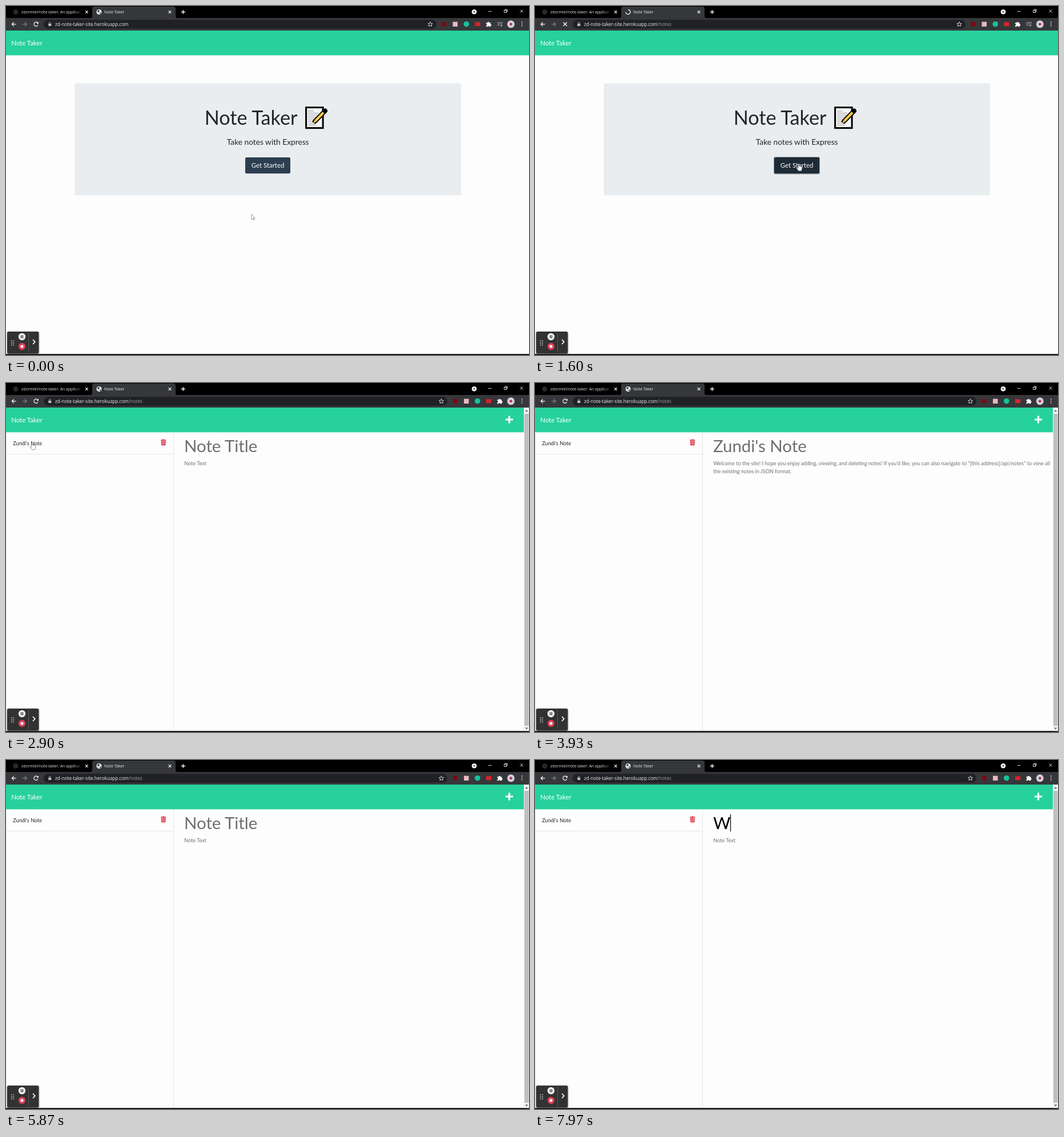
An HTML page for the animation above (8000 ms loop, 916 by 611 pixels).

```html
<!DOCTYPE html>
<html lang="en">
<head>
<meta charset="utf-8">
<title>Note Taker</title>
<style>
  html, body { margin: 0; width: 100%; height: 100%; overflow: hidden; background: #000; }
  svg { display: block; width: 916px; height: 611px; }
  text { font-family: Lato, sans-serif; white-space: pre; }
  .ui { font-family: "Open Sans", "Noto Sans", sans-serif; }
  .line { fill: none; stroke: #fff; }
  .mid { text-anchor: middle; }
  .base { font-size: 9.15px; }
  .title { font-size: 29.4px; }
  .brand { font-size: 11.44px; fill: #fff; }
</style>
</head>
<body>
<svg viewBox="0 0 916 611">
  <defs>
    <linearGradient id="fade" gradientUnits="userSpaceOnUse" x1="119" x2="133" y1="0" y2="0">
      <stop offset="0" stop-color="#e0e0e0"/><stop offset="1" stop-color="#e0e0e0" stop-opacity="0"/>
    </linearGradient>
    <filter id="shadow" x="-20%" y="-20%" width="140%" height="140%">
      <feDropShadow dx="0" dy="1" stdDeviation="1.5" flood-opacity=".45"/>
    </filter>
  </defs>

  <rect y="43" width="916" height="566.5" fill="#fdfdfd"/>
  <rect y="43" width="916" height="43.3" fill="#27d19c"/>
  <text class="brand" x="9.2" y="69">Note Taker</text>

  <g id="home">
    <rect x="120.5" y="135.5" width="676.5" height="196" rx="2.5" fill="#e9edef"/>
    <text x="347.7" y="207.5" font-size="34.2" fill="#212529">Note Taker</text>
    <g id="memo">
      <rect x="525.6" y="177.6" width="29.5" height="36" fill="#f4f4f4" stroke="#000" stroke-width="3"/>
      <path d="M529 184h10M529 187.5h18M529 191h18M529 194.5h15M529 198h12M529 201.5h9M529 205h9M529 208.5h14" stroke="#9a9da0" stroke-width="1.1"/>
      <path d="M559 183.5L541 202" stroke="#000" stroke-width="8" stroke-linecap="round"/>
      <path d="M556 186.5L541.5 201.5" stroke="#f7ca45" stroke-width="4.2"/>
      <path d="M540 200l3 3-5.500 3z" fill="#e8b878"/>
    </g>
    <text class="mid" x="458.7" y="242.500" font-size="13.73" fill="#212529">Take notes with Express</text>
    <rect id="ring" x="418" y="264" width="81" height="30.500" rx="3" fill="#8d9b9f"/>
    <rect id="button" x="419" y="265" width="79" height="28.300" rx="2.500"/>
    <text class="brand mid" x="458.5" y="283.3">Get Started</text>
  </g>

  <g id="notes">
    <path d="M.5 86.500V609M293.500 86.500V609M1 124.300H293" stroke="#e3e5e7" fill="none"/>
    <text class="base" x="12.3" y="108.500" fill="#212529">Zundi's Note</text>
    <g fill="#d9364a">
      <path d="M271 99.600h3l.7-1.100h2.200l.7 1.100h2.900v1.400H271zM271.700 101.700h8.200l-.5 7.600h-7.200z"/>
      <path d="M273.800 103v5M275.800 103v5M277.800 103v5" stroke="#fbe4e7" stroke-width=".7"/>
    </g>
    <path class="line" d="M881.500 57.500v13M875 64h13" stroke-width="3.200"/>
    <text id="noteTitle" class="title" x="312" y="121"></text>
    <text class="base" x="312.200" y="144" fill="#707070"><tspan id="line1"></tspan><tspan id="line2" x="312.200" dy="13.600"></tspan></text>
    <path id="caret" d="M0 95V125" stroke="#000" stroke-width="1.200"/>
    <rect x="907" y="43" width="9" height="566.500" fill="#f1f1f1"/>
    <rect x="908" y="54" width="7.500" height="546" fill="#bfbfbf"/>
    <path d="M909.500 50l2.300-3 2.300 3zM909.500 603.500l2.300 3 2.300-3z" fill="#555"/>
  </g>

  <g id="chrome">
    <rect width="916" height="43" fill="#000"/>
    <path d="M147 21.500q4 0 4-4V5q0-4 4-4h138q4 0 4 4v12.500q0 4 4 4z" fill="#36373a"/>
    <rect y="21" width="916" height="22" fill="#36373a"/>
    <circle cx="17" cy="10.500" r="4.500" fill="#24292e"/>
    <text class="ui" x="27" y="13" font-size="6.900" fill="url(#fade)">zdormiel/note-taker: An applicat</text>
    <text class="ui" x="172" y="13" font-size="7" fill="#eee">Note Taker</text>
    <g id="globe">
      <circle cx="163" cy="10.500" r="4.500" fill="#f1f3f4"/>
      <path d="M160 8.500l3-1.500 1.300 1.500-1.800 2.200-2.500-.5zM164 11.500l2.300-.5-.8 2.500-1.500.5zM160.500 12l1.800.8-.3 1.200z" fill="#36373a"/>
    </g>
    <path id="spinner" class="line" d="M163 6.500a4 4 0 1 1-4 4" stroke-width="1.300"/>
    <path class="line" d="M139 8.200l4.600 4.600m0-4.600l-4.600 4.600M284.700 8.200l4.600 4.600m0-4.600l-4.600 4.600" stroke-width="1.100"/>
    <path class="line" d="M310.300 7v7M306.800 10.500h7" stroke-width="1.300"/>
    <circle cx="820" cy="10.300" r="4.300" fill="#fff"/>
    <path d="M818 9.500h4l-2 2.300z"/>
    <path class="line" d="M844.500 9.500h6M872.500 7.500h4v4h-4zM874 7.500V6h4v4h-1.500M900.500 6.500l5 5m0-5l-5 5" stroke-width=".8"/>
    <path class="line" d="M17.500 31.800h-7.200m3.500-3.500l-3.500 3.500 3.500 3.500" stroke-width="1.200"/>
    <path class="line" d="M29 31.800h7.200m-3.500-3.500l3.500 3.500-3.500 3.500" stroke-width="1.200" style="stroke:#818386"/>
    <path id="reload" class="line" d="M55.500 29.600a3.600 3.600 0 1 0 .5 3.300M56.300 28v2.500h-2.500" stroke-width="1.200"/>
    <path id="stop" class="line" d="M49.500 28.500l6.500 6.500m0-6.500l-6.500 6.500" stroke-width="1.300"/>
    <rect id="omnibox" x="66" y="24.300" height="15.400" rx="7.700" fill="#202124"/>
    <rect x="74.300" y="31" width="5" height="4" rx=".5" fill="#bdc1c6"/>
    <path class="line" d="M75.400 31v-1.200a1.400 1.400 0 0 1 2.800 0V31" stroke-width=".8" style="stroke:#bdc1c6"/>
    <text class="ui" x="86" y="34.700" font-size="8.140" fill="#eee">zd-note-taker-site.herokuapp.com<tspan id="path" fill="#9aa0a6">/notes</tspan></text>
    <g id="extensions">
      <path class="line" d="M743 27.800l1.200 2.700 2.900.3-2.200 1.900.7 2.900-2.600-1.500-2.600 1.500.7-2.900-2.200-1.900 2.900-.3z" stroke-width=".8"/>
      <circle cx="767.300" cy="31.800" r="4" fill="#80060f"/>
      <rect x="782.500" y="27.700" width="8.500" height="8.300" fill="#e6b9bd"/>
      <circle cx="806.300" cy="31.700" r="4.800" fill="#15c39a"/>
      <rect x="821.500" y="28.300" width="9" height="7" fill="#d8232e"/>
      <path d="M841 29.300h2.400a1.500 1.500 0 0 1 3 0h2.300v2.300a1.500 1.500 0 0 1 0 3V36.300h-2.500a1.400 1.400 0 0 0-2.800 0H841v-2.200a1.400 1.400 0 0 0 0-2.800z" fill="#fff"/>
    </g>
    <g id="media">
      <path class="line" d="M860.500 28.700h6.500M860.500 31.200h6.500M860.500 33.700h4M868.300 34.500v-6h1.700" stroke-width="1" style="stroke:#a5a7aa"/>
      <circle cx="867.200" cy="34.500" r="1.300" fill="#a5a7aa"/>
    </g>
    <circle cx="884.300" cy="31.800" r="6.500" fill="#cfd3e2"/>
    <circle cx="884.300" cy="31.800" r="2.400" fill="#c6285a"/>
    <path d="M903.700 28.200v8" stroke="#fff" stroke-width="1.700" stroke-dasharray="0 3.300" stroke-linecap="round"/>
  </g>

  <g id="recorder">
    <rect x="2" y="570" width="55.500" height="38.500" rx="2.500" fill="#333" filter="url(#shadow)"/>
    <path d="M9.700 585.500v9M13.200 585.500v9" stroke="#ddd" stroke-width="1.600" stroke-dasharray="1.600 2"/>
    <circle cx="28" cy="579" r="6.200" fill="#f5f5f5"/>
    <path d="M26.600 576.300v5.400M29.400 576.300v5.400" stroke="#222" stroke-width="1.300"/>
    <circle cx="28" cy="596" r="6.200" fill="#dc3c56"/>
    <rect x="25.700" y="593.700" width="4.600" height="4.600" fill="#fff"/>
    <path d="M39.500 572v34" stroke="#666" stroke-width=".8"/>
    <path class="line" d="M47 584l3.800 4-3.800 4" stroke-width="1.700"/>
  </g>
  <rect y="609.500" width="916" height="1.500"/>

  <g id="cursor" fill="#fff" stroke="#555" stroke-width=".6" stroke-linejoin="round">
    <path id="arrow" d="M0 0v9l2-1.800 1.500 3.300 1.500-.7-1.500-3.100h2.700z"/>
    <path id="hand" d="M-1 1q0-1.200 1-1.200t1 1.200v3.200l3.700.8q1.300.3 1.300 1.500l-.6 3-.9 2.800h-5l-3.300-4.500q-.6-1 .3-1.400.8-.2 1.500.7l1 .8z"/>
  </g>
</svg>
<script>
const LOOP = 8000;
const CLICK_START = 1420, NOTES_OPEN = 1650, SHOW_NOTE = 3300, NEW_NOTE = 5300, FOCUS = 7000, TYPE = 7700;

// Pointer stops: time, x, y
const STOPS = [
  [0, 430, 364.5], [300, 430, 364.5], [850, 462, 276.5], [1750, 462, 276.5],
  [2600, 46, 104.500], [3450, 46, 104.500], [3800, 330, 140], [4600, 700, 130],
  [5050, 881, 64], [5450, 881, 64], [5800, 840, 100], [6700, 440, 110], [8000, 440, 110]
];
const EMPTY = ["Note Title", "Note Text", ""];
const WELCOME = [
  "Zundi's Note",
  "Welcome to the site! I hope you enjoy adding, viewing, and deleting notes! If you'd like, you can also navigate to \"[this address]/api/notes\" to view all",
  "the existing notes in JSON format."
];

const $ = id => document.getElementById(id);
const show = (id, on) => $(id).setAttribute("visibility", on ? "visible" : "hidden");
const attr = (id, name, value) => $(id).setAttribute(name, value);
const setText = (id, value) => { if ($(id).textContent !== value) $(id).textContent = value; };

function pointerAt(t) {
  const i = STOPS.findIndex(stop => stop[0] > t);
  const [t0, x0, y0] = STOPS[i - 1], [t1, x1, y1] = STOPS[i];
  const p = (t - t0) / (t1 - t0), e = p * p * (3 - 2 * p);
  return [x0 + (x1 - x0) * e, y0 + (y1 - y0) * e];
}

function pointerKind(x, y, onNotes) {
  if (!onNotes) return x > 419 && x < 498 && y > 265 && y < 293 ? "hand" : "arrow";
  if (y < 86) return x > 872 && x < 891 ? "hand" : "arrow";
  if (x > 293) return "none";
  return y < 124 ? "hand" : "arrow";
}

function draw(t) {
  const onNotes = t >= NOTES_OPEN;
  const loading = t >= CLICK_START && !onNotes;
  const [x, y] = pointerAt(t), kind = pointerKind(x, y, onNotes);

  attr("home", "display", onNotes ? "none" : "inline");
  attr("notes", "display", onNotes ? "inline" : "none");
  show("media", !onNotes);
  attr("extensions", "transform", `translate(${onNotes ? 19.5 : 0})`);
  attr("omnibox", "width", onNotes ? 707 : 688);
  show("path", t >= CLICK_START);
  show("globe", !loading);
  show("spinner", loading);
  show("reload", !loading);
  show("stop", loading);
  attr("spinner", "transform", `rotate(${(t - 1600) * 0.36} 163 10.5)`);
  attr("ring", "display", loading ? "inline" : "none");
  attr("button", "fill", kind === "hand" ? "#1e2b37" : "#2c3e50");

  const typed = t >= TYPE;
  const [title, line1, line2] = t >= SHOW_NOTE && t < NEW_NOTE ? WELCOME : EMPTY;
  setText("noteTitle", typed ? "W" : title);
  attr("noteTitle", "fill", typed ? "#000" : "#6e6e6e");
  setText("line1", line1);
  setText("line2", line2);

  const blinkStart = typed ? TYPE : FOCUS;
  attr("caret", "display", t >= FOCUS && (t - blinkStart) % 1060 < 530 ? "inline" : "none");
  attr("caret", "transform", `translate(${typed ? 342.5 : 313})`);

  attr("cursor", "transform", `translate(${x} ${y})`);
  show("arrow", kind === "arrow");
  show("hand", kind === "hand");
}

function tick() {
  draw(performance.now() % LOOP);
  requestAnimationFrame(tick);
}
tick();
</script>
</body>
</html>
```
